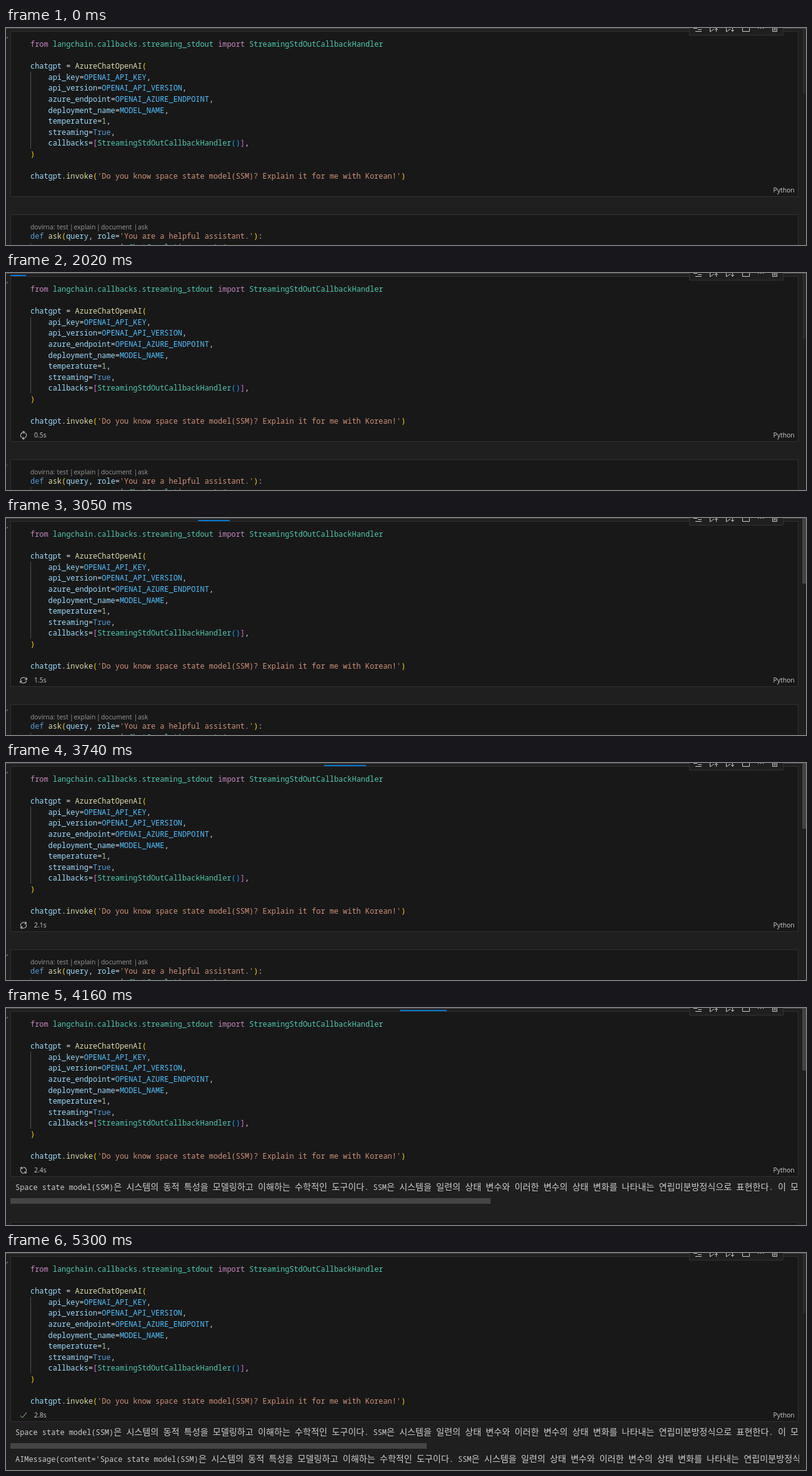
Animation, 1280 px wide and 347 px high, one loop 5.37 s. Source, as an HTML page:

```html
<!DOCTYPE html>
<html lang="en">
<head>
<meta charset="utf-8">
<style>
  html, body { margin: 0; width: 100%; height: 100%; overflow: hidden; background: #1f1f1f; }
  svg { display: block; }
  text { white-space: pre; }
  .code { font: 500 11.91px "Noto Sans Mono", monospace; }
  .hangul { font: 14.12px "Noto Sans CJK KR", "Noto Sans CJK", sans-serif; }
  .ui { font: 10.4px "Open Sans", sans-serif; fill: #ccc; }
  .lens { fill: #999; }
  .cell { fill: #181818; stroke: #303031; }
  .icon { fill: none; stroke: #ccc; }
  .chevron { fill: none; stroke: #999; }
</style>
</head>
<body>
<svg width="1280" height="347" viewBox="0 0 1280 347">
  <clipPath id="pane"><path d="M7 271H1269V347H7z"/></clipPath>
  <path d="M0 .5H1280" stroke="#4a4a4a"/>
  <rect class="cell" x="7.5" y="5.5" width="1260" height="264"/>
  <path d="M39.5 70V193" stroke="#505050"/>
  <g id="code"></g>
  <text class="ui" x="1227.5" y="263">Python</text>

  <path d="M1093.5 0V11.5H1243.5V0" fill="#1f1f1f" stroke="#333"/>
  <g class="icon">
    <path d="M1100 .5H1106M1103 5.5H1113M1107 2.5H1113"/>
    <path d="M1126.5 0V6L1133 1.5M1136.5 6V1M1134 3L1136.5 .5L1139 3"/>
    <path d="M1152.5 0V6L1159 1.5M1162.5 0V5.5M1160 3L1162.5 5.5L1165 3"/>
    <path d="M1178.5 0V5.5H1189.5V0"/>
    <path d="M1203 .5H1204.5M1207 .5H1208.5M1211 .5H1212.5"/>
    <path d="M1226.5 0V5.5H1233.5V0M1229 0V4M1231 0V4"/>
  </g>

  <rect id="hover" y="8" width="7" height="17" fill="#2d2e2f"/>
  <path class="chevron" d="M0 17L3 14"/>

  <g id="next">
    <rect class="cell" x="7.5" y="298.5" width="1260" height="90"/>
    <path d="M39.5 343V347" stroke="#404040"/>
    <g id="lens"></g>
  </g>
  <path id="chevron" class="chevron" d="M0 309L3 306"/>

  <g id="output" clip-path="url(#pane)" fill="#ccc">
    <g id="stream"></g>
    <g id="result"></g>
  </g>
  <rect id="hbar" x="7" y="304" height="9" fill="#454545"/>
  <rect id="vbar" x="1274" y="1" width="6" fill="#434343"/>

  <rect id="progress" y="3" height="2" fill="#0078d4"/>
  <g id="spinner" class="icon">
    <path d="M-4.6 -1.2A4.8 4.8 0 0 1 4.7 -.6M5.6 -3.6V-.4H2.4"/>
    <path d="M4.6 1.2A4.8 4.8 0 0 1 -4.7 .6M-5.6 3.6V.4H-2.4"/>
  </g>
  <path id="done" d="M23 260L26.3 263.3L33 255" fill="none" stroke="#89d185"/>
  <text id="timer" class="ui" x="45" y="263"></text>
</svg>
<script>
const LOOP = 5370, START = 1530, STEP = 69.2, OUTPUT = 3790, END = 4300;
const ADVANCE = 7.147, HANGUL = 13, ROW = 17.6;
const PANE = 1261;
const COLORS = {
  keyword: '#c586c0', type: '#4ec9b0', name: '#9cdcfe', plain: '#d4d4d4', call: '#dcdcaa',
  gold: '#ffd700', pink: '#da70d6', blue: '#179fff', constant: '#4fc1ff', number: '#b5cea8',
  literal: '#569cd6', string: '#ce9178'
};
const $ = id => document.getElementById(id);
const clamp = v => Math.max(0, Math.min(1, v));
const show = (id, on) => $(id).setAttribute('visibility', on ? 'visible' : 'hidden');
const set = (id, attrs) => { for (const k in attrs) $(id).setAttribute(k, attrs[k]); };

function addText(parent, x, y, str, cls, fill) {
  const el = document.createElementNS('http://www.w3.org/2000/svg', 'text');
  el.setAttribute('x', x);
  el.setAttribute('y', y);
  el.setAttribute('class', cls);
  if (fill) el.setAttribute('fill', fill);
  el.textContent = str;
  $(parent).append(el);
  return el;
}

// Each line alternates colour names and text.
function addLine(parent, y, line, col = 0) {
  for (let i = 0; i < line.length; i += 2) {
    addText(parent, 39 + col * ADVANCE, y, line[i + 1], 'code', COLORS[line[i]]);
    col += line[i + 1].length;
  }
}
const arg = (name, ...value) => ['name', '    ' + name, 'plain', '=', ...value, 'plain', ','];

[
  ['keyword', 'from ', 'type', 'langchain.callbacks.streaming_stdout', 'keyword', ' import ',
    'type', 'StreamingStdOutCallbackHandler'],
  [],
  ['name', 'chatgpt', 'plain', ' = ', 'call', 'AzureChatOpenAI', 'gold', '('],
  arg('api_key', 'constant', 'OPENAI_API_KEY'),
  arg('api_version', 'constant', 'OPENAI_API_VERSION'),
  arg('azure_endpoint', 'constant', 'OPENAI_AZURE_ENDPOINT'),
  arg('deployment_name', 'constant', 'MODEL_NAME'),
  arg('temperature', 'number', '1'),
  arg('streaming', 'literal', 'True'),
  arg('callbacks', 'pink', '[', 'type', 'StreamingStdOutCallbackHandler', 'blue', '()', 'pink', ']'),
  ['gold', ')'],
  [],
  ['name', 'chatgpt', 'plain', '.', 'call', 'invoke', 'gold', '(',
    'string', "'Do you know space state model(SSM)? Explain it for me with Korean!'", 'gold', ')']
].forEach((line, i) => addLine('code', 30 + i * ROW, line));

addLine('next', 337, ['literal', 'def ', 'call', 'ask', 'gold', '(', 'name', 'query', 'plain', ', ',
  'name', 'role', 'plain', '=', 'string', "'You are a helpful assistant.'", 'gold', ')', 'plain', ':']);
addLine('next', 354.6, ['name', '    response', 'plain', ' = ', 'name', 'openai', 'plain', '.',
  'type', 'ChatCompletion', 'plain', '.', 'call', 'create', 'gold', '(']);

[[39, 'dovirna:'], [81.5, 'test'], [102, '|'], [108.5, 'explain'], [145, '|'],
 [152, 'document'], [204.5, '|'], [211, 'ask']]
  .forEach(([x, word]) => addText('lens', x, 321.5, word, 'ui lens'));

// Mixed Latin and Korean text on a two-width grid.
function addMixed(parent, y, str) {
  let x = 15;
  return str.match(/[가-힣]+ ?|[^가-힣]+/g).map(run => {
    const word = run.trimEnd(), korean = /[가-힣]/.test(run);
    const el = addText(parent, x, y, word, korean ? 'hangul' : 'code');
    const at = x;
    x += word.length * (korean ? HANGUL : ADVANCE) + (run.length - word.length) * ADVANCE;
    return { el, x: at };
  });
}
const answer = 'Space state model(SSM)은 시스템의 동적 특성을 모델링하고 이해하는 수학적인 도구이다. ' +
  'SSM은 시스템을 일련의 상태 변수와 이러한 변수의 상태 변화를 나타내는 연립미분방정식으로 표현한다. 이 모';
const stream = addMixed('stream', 291, answer);
addMixed('result', 334, "AIMessage(content='" + answer);

function draw(t) {
  const now = t < START ? t : START + Math.floor((t - START + 5) / STEP) * STEP;
  const running = t >= START && t < END - 5, finished = t >= END - 5;
  const spin = (now - 2020) * 0.962;

  // Cell status
  show('spinner', running);
  show('done', finished);
  set('spinner', { transform: `translate(28 259.5) rotate(${0.24 * spin - 248})` });
  const tenths = Math.floor((0.89 * (now - START) + 150) / 100);
  $('timer').textContent = finished ? '2.8s' : running ? (tenths / 10).toFixed(1) + 's' : '';

  // Progress bit: crosses in 4 s, three times as wide in the middle
  const p = clamp(spin / 4000), unit = PANE / 50;
  const scale = 3 - 4 * Math.abs(p - 0.5);
  const shift = p < 0.5 ? 50 * p : 25 + 48 * (p - 0.5);
  show('progress', running && now > 1940);
  set('progress', { x: 7 + unit * (0.5 + shift - scale / 2), width: unit * scale });

  // Streamed output
  const length = finished ? 2387 : Math.max(0, (now - OUTPUT) * 5.6);
  const hasOutput = length > 0, overflow = length > PANE;
  stream.forEach(run => run.el.setAttribute('visibility', run.x < length ? 'visible' : 'hidden'));
  show('result', finished);
  show('hbar', overflow);
  set('hbar', { width: overflow ? PANE * PANE / length : 0 });
  set('next', { transform: `translate(0 ${finished ? 90 : overflow ? 44 : hasOutput ? 34 : 0})` });

  // Hover states and vertical scrollbar
  show('hover', t >= 930 && t < START);
  set('chevron', { opacity: hasOutput ? 0 : 0.4 * clamp((t - 70) / 130) + 0.6 * clamp((now - 2700) / 300) });
  const glow = t < START ? clamp((t - 600) / 140)
    : t < 2640 ? 1 - clamp((now - START) / 490)
    : t < 5300 ? clamp((now - 2600) / 140) : 0;
  set('vbar', { height: finished ? 95 : hasOutput ? 99 : 104, opacity: 0.25 + 0.75 * glow });
}

function frame() {
  draw(performance.now() % LOOP);
  requestAnimationFrame(frame);
}
frame();
</script>
</body>
</html>
```
